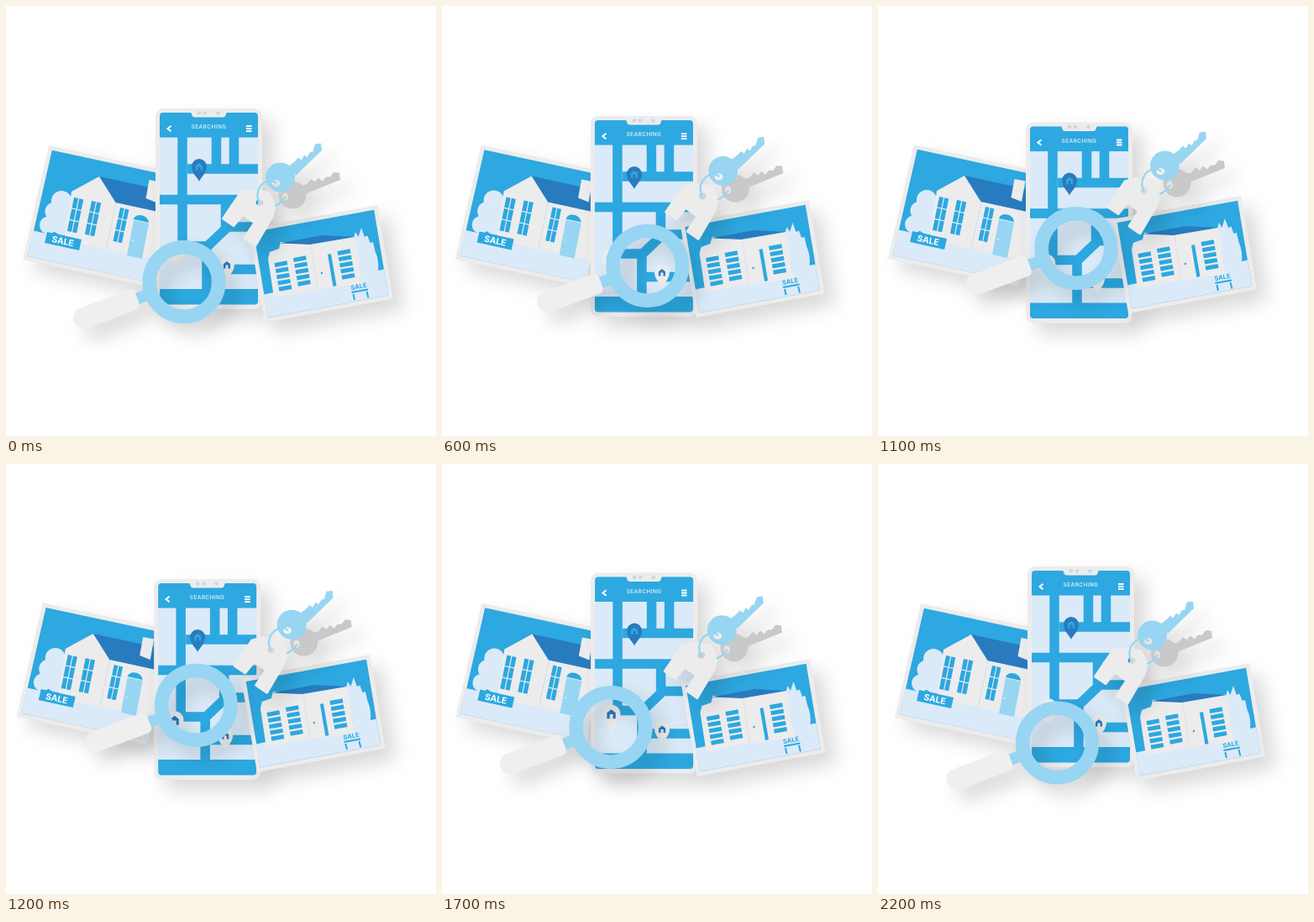
Animation of 512 by 512 pixels, one loop 2300 ms. Source, as an HTML page:

```html
<!DOCTYPE html>
<html lang="en">
<head>
<meta charset="utf-8">
<title>House search</title>
<style>
  html, body { margin: 0; width: 100%; height: 100%; overflow: hidden; background: #fff; }
  svg { display: block; width: 100vw; height: 100vh; }
  text { font-family: Inter, "Open Sans", Arial, sans-serif; font-weight: 700; text-anchor: middle; }
  .card { filter: drop-shadow(13px 13px 11px rgba(0, 0, 0, .15)); }
  .blue { fill: #2da8e0; }
  .dark { fill: #297bbf; }
  .sky { fill: #98d5f2; }
  .pale { fill: #dbeaf8; }
  .white { fill: #ececed; }
  .gray { fill: #c7c9cb; }
  .line { fill: none; stroke: #2da8e0; }
  .edge { fill: none; stroke: #cfd6dc; stroke-width: .5; }
  .ring { fill: none; stroke: #98d5f2; stroke-width: 2.3; }
</style>
</head>
<body>
<svg viewBox="0 0 512 512">
  <defs>
    <path id="window" class="blue" d="M0 0h5.2v12.6H0zM6.4 0h5.2v12.6H6.4zM0 13.8h5.2v12.6H0zM6.4 13.8h5.2v12.6H6.4zM0 27.6h5.2v13H0zM6.4 27.6h5.2v13H6.4z"/>
    <path id="pin" d="M0 18C-2 13-9 8-9 0A9 9 0 0 1 9 0C9 8 2 13 0 18Z"/>
    <path id="home" d="M-4.5 4.5V-1.5L0-5L4.5-1.5V4.5H1.7V0H-1.7V4.5Z"/>
    <path id="slats" class="blue" d="M0 0h16v5H0zM0 7.3h16v5H0zM0 14.6h16v5H0zM0 21.9h16v5H0zM0 29.2h16v5H0z"/>
  </defs>

  <g id="left" class="card">
    <path class="white" d="M51 166L205 199L174 335L20 302Z"/>
    <path class="blue" d="M54.800 171.800L200 203L171 329L26 298Z"/>
    <path class="pale" d="M32.500 267.500L178 299V331L26 298Z"/>
    <g class="pale">
      <circle cx="66" cy="232" r="12"/><circle cx="58" cy="245" r="11.500"/>
      <circle cx="50.500" cy="261" r="10.500"/><circle cx="69" cy="256" r="17"/>
    </g>
    <path class="white" d="M131 234L190 246V305L119 290Z"/>
    <path class="dark" d="M111 203L190 220V247L131 234Z"/>
    <path class="white" d="M111 203L78 221L69 279L119 290L131 235Z"/>
    <path class="edge" d="M131 235L119 290M26 298L171 329"/>
    <path class="white" d="M170.500 207L183.500 209.500L179 234L166.500 229Z"/>
    <use href="#window" transform="matrix(.97 .21 -.2 .98 81 228)"/>
    <use href="#window" transform="matrix(.97 .21 -.2 .98 102 232)"/>
    <use href="#window" transform="matrix(.9 .21 -.21 .98 136 240)"/>
    <path class="sky" d="M152 255L170 259L162 301L144 297Z"/>
    <path class="blue" d="M152 254C154 246 169 248 170 258Z"/>
    <circle class="white" cx="151" cy="279" r="1"/>
    <path class="blue" d="M49 269L90 278L87 291L46 282Z"/>
    <text transform="translate(67 283.6) rotate(12)" font-size="10.3" fill="#fff">SALE</text>
  </g>

  <g id="phone" class="card">
    <rect class="white" x="178" y="122" width="127" height="239" rx="9"/>
    <rect class="pale" x="183" y="127" width="117" height="228" rx="4"/>
    <path class="blue" d="M183 156.500V131Q183 127 187 127H296Q300 127 300 131V156.500ZM183 337H300V351.500Q300 355.500 296 355.500H187Q183 355.500 183 351.500Z"/>
    <path class="white" d="M220 126H263L261.500 130Q261 132.500 258 132.500H225Q222 132.500 221.500 130Z"/>
    <g fill="#ccd7df"><circle cx="230" cy="127.500" r="2.200"/><circle cx="237" cy="127.500" r="2.200"/><circle cx="252.500" cy="127.500" r="2.200"/></g>
    <text x="241.500" y="146.400" font-size="6.400" letter-spacing=".42" fill="#c5e5f7">SEARCHING</text>
    <path d="M196.500 142.800L192.500 146L196.500 149.200" fill="none" stroke="#fff" stroke-width="2"/>
    <path d="M286 143h6.500M286 146h6.500M286 149h6.500" stroke="#fff" stroke-width="1.800"/>
    <path class="line" stroke-width="11.500" d="M210 156V291M216 194H300M250.500 156V190M271.500 156V190M183 230.500H300M261.500 234V262M300 263H264L240 286H210M239 283V338M242 313.500H300"/>
    <use href="#pin" class="dark" x="230" y="191"/>
    <use href="#home" class="blue" transform="translate(230 191.500) scale(.9)"/>
    <use href="#pin" class="white" transform="translate(202.500 290) scale(1.200)"/>
    <use href="#home" class="dark" transform="translate(202.500 290.500) scale(1.150)"/>
    <use href="#pin" class="white" x="263" y="308"/>
    <use href="#home" class="dark" transform="translate(263 308.500) scale(.9)"/>
  </g>

  <g id="right" class="card">
    <path class="white" d="M289 265L442.500 237L461 348.500L308 377Z"/>
    <path class="blue" d="M294.800 269L438.200 242.800L455.200 344.500L312 371.200Z"/>
    <path class="pale" d="M307 343.500L450 313.500L455.200 344.500L312 371.200Z"/>
    <path class="edge" d="M312 371.200L455.200 344.500"/>
    <path class="pale" d="M424 329L414 277L416 269L419.500 275L423 264L427 275L430.500 273.500L433.500 282L437 281L439.500 292Q444.500 303 443 316L440 318Z"/>
    <path class="white" d="M312 301L314 293L325 289L327 281L363 284L371 337L319 347Z"/>
    <path class="dark" d="M326 282.500L376 273L415 275L363 284Z"/>
    <path class="white" d="M362 284L415 275L424 330L371 338Z"/>
    <path class="edge" d="M363 284L371 337"/>
    <use href="#slats" transform="translate(319.500 306) rotate(-10) scale(.95 1)"/>
    <use href="#slats" transform="translate(342 300) rotate(-10) scale(.95 1)"/>
    <use href="#slats" transform="translate(394.500 292) rotate(-10) scale(.96 1)"/>
    <path class="blue" d="M383 296L387 295L393.500 333L389.500 334Z"/>
    <circle class="blue" cx="376" cy="318" r="1.200"/>
    <text class="blue" transform="translate(420.500 336.500) rotate(-10)" font-size="7.500">SALE</text>
    <path class="line" stroke-width="2" d="M411.500 341L431 337.500M413.500 343L415 350M429.500 340L431.500 347.500"/>
  </g>

  <g id="keys" class="card">
    <path class="gray" d="M350 214L358 212.500L363 206L368 209.500L372 204.500L377 208.500L381 203.500L386 203.500L390 198L397 198.500L398 207L357 223.500Z"/>
    <path class="gray" fill-rule="evenodd" d="M324.500 225A16.500 16.500 0 1 0 357.500 225A16.500 16.500 0 1 0 324.500 225ZM329 227A3.500 4.500 0 1 0 336 227A3.500 4.500 0 1 0 329 227Z"/>
    <path class="sky" d="M336 191L344 185L348 180.500L351.500 183.500L355 177.500L358.500 180L362 174L365 174L368 164.500L375 163.500L376 172L345 202Z"/>
    <path class="sky" fill-rule="evenodd" d="M309 204A17.500 17.500 0 1 0 344 204A17.500 17.500 0 1 0 309 204ZM316.500 211A5 4 0 1 0 326.500 211A5 4 0 1 0 316.500 211Z"/>
    <path class="white" fill-rule="evenodd" stroke="#ececed" stroke-width="3" stroke-linejoin="round" d="M258.500 253L279 223L291 219.500L313 222.500L320.500 238L317 251L297 285L284 276L296 258L282 248L271 261.500ZM296 234A6 5.500 0 1 0 308 234A6 5.500 0 1 0 296 234Z"/>
    <path class="ring" d="M302 235C296 224 301 211 313 208Q319 207 322 211M320 238Q327 236 333 227"/>
  </g>

  <g id="glass" class="card">
    <path d="M-64 23L-42 15" stroke="#98d5f2" stroke-width="14"/>
    <circle r="41.300" fill="none" stroke="#98d5f2" stroke-width="16.500"/>
    <path fill="#efeff0" transform="translate(-119.500 43) rotate(-20.400)" d="M0-12.500H61Q68-12.500 68-5.500V5.500Q68 12.500 61 12.500H0A12.500 12.500 0 0 1 0-12.500Z"/>
  </g>
</svg>
<script>
const LOOP = 2300, STEP = 100, HALF = 1100;
// Full travel of each floating part at the middle of the loop
const drift = { left: [-8, -1], phone: [-2, 16.5], right: [-10, -11], keys: [15, -14] };
// Lens centre: time, x, y
const path = [
  [0, 212, 328.5], [300, 228, 321.5], [800, 249, 300.5], [1100, 236, 288.5],
  [1400, 206, 290.5], [1700, 201, 313.5], [2200, 213.5, 332]
];

const slope = (i, axis) => (path[i + 1][axis] - path[i][axis]) / (path[i + 1][0] - path[i][0]);

function tangent(i, axis) {
  if (i === 0) return slope(0, axis);
  if (i === path.length - 1) return slope(i - 1, axis);
  const before = path[i][0] - path[i - 1][0], after = path[i + 1][0] - path[i][0];
  return (slope(i - 1, axis) * after + slope(i, axis) * before) / (before + after);
}

// Cubic Hermite curve through the path points
function lens(t, axis) {
  let i = 0;
  while (i < path.length - 2 && t >= path[i + 1][0]) i++;
  const a = path[i], b = path[i + 1], h = b[0] - a[0], u = (t - a[0]) / h, v = 1 - u;
  return a[axis] * (1 + 2 * u) * v * v + b[axis] * u * u * (3 - 2 * u)
    + h * u * v * (tangent(i, axis) * v - tangent(i + 1, axis) * u);
}

function move(id, x, y) {
  document.getElementById(id).setAttribute("transform", `translate(${x} ${y})`);
}

function draw(now) {
  const t = Math.floor(now % LOOP / STEP) * STEP;
  const p = 1 - Math.abs(t - HALF) / HALF;
  for (const id in drift) move(id, drift[id][0] * p, drift[id][1] * p);
  move("glass", lens(t, 1), lens(t, 2));
  requestAnimationFrame(() => draw(performance.now() - start));
}

const start = performance.now();
draw(0);
</script>
</body>
</html>
```
